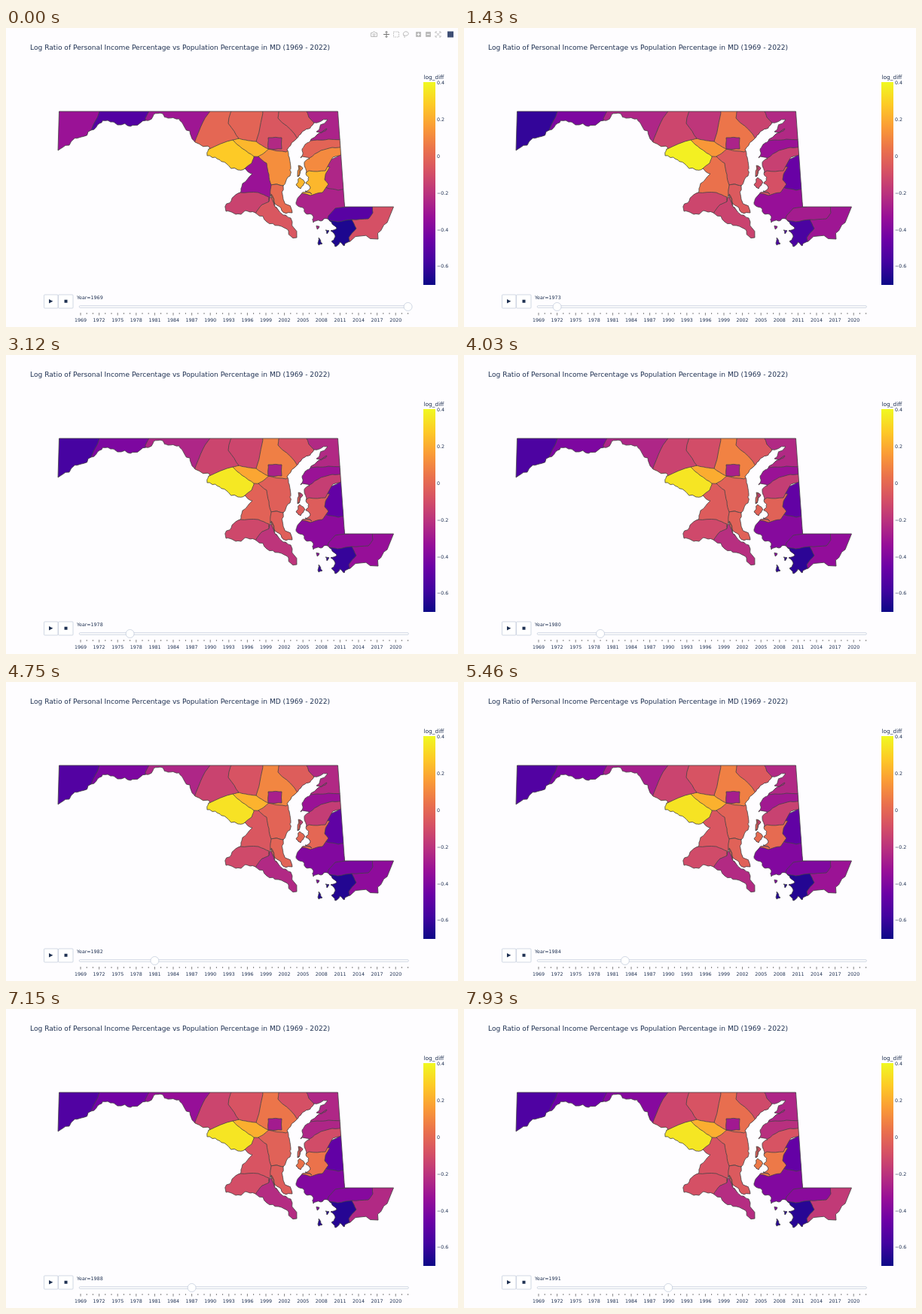
Recreate the animation shown at these times as an HTML page. Size 600 by 398 pixels, loop 8 s.

```html
<!DOCTYPE html>
<html lang="en">
<head>
<meta charset="utf-8">
<title>Income ratio map</title>
<style>
  html, body { margin: 0; width: 100%; height: 100%; overflow: hidden; background: #fefdff; }
  svg { display: block; width: 600px; height: 398px; font: 6.3px "DejaVu Sans", sans-serif; fill: #1f3152; }
  #map { stroke: #444; stroke-width: .8; stroke-linejoin: round; }
  .control { fill: #fff; stroke: #bec8d9; stroke-width: .7; }
  .icon { fill: none; stroke: #bbb; }
</style>
</head>
<body>
<svg viewBox="0 0 600 398">
  <defs>
    <linearGradient id="scale" x1="0" y1="1" x2="0" y2="0"></linearGradient>
    <clipPath id="land"></clipPath>
  </defs>
  <text x="32" y="28.6" font-size="9.11">Log Ratio of Personal Income Percentage vs Population Percentage in MD (1969 - 2022)</text>

  <g id="toolbar" class="icon">
    <path d="M484.5 6.5h2l1-1.5h2l1 1.5h2v5h-8z"/><circle cx="488.5" cy="9" r="1.4"/>
    <path stroke="#777" d="M501 8.5h8M505 4.5v8M503.5 6l1.5-1.5 1.5 1.5M503.5 11l1.5 1.5 1.5-1.5"/>
    <path stroke-dasharray="1.5 1" d="M514.5 5h7v7h-7z"/>
    <path d="M528 10c-2-3 1-6 4-5s3 4 0 5-4-1-4 0 2 1 1 3"/>
    <path fill="#bbb" d="M544.5 5.5h6v6h-6zM557.5 5.5h6v6h-6z"/>
    <path stroke="#fff" d="M545.5 8.5h4M547.5 6.5v4M558.5 8.5h4"/>
    <path d="M570 7V5h2M575 5h2v2M577 10v2h-2M572 12h-2v-2M571.5 6.500l4 4M575.5 6.5l-4 4"/>
    <rect x="586" y="4.5" width="8" height="8" fill="#3f4f75" stroke="none"/>
  </g>

  <g id="map"><g id="counties" clip-path="url(#land)"></g></g>

  <text x="554.5" y="68" font-size="7.4">log_diff</text>
  <rect x="554" y="72" width="16" height="270" fill="url(#scale)"/>
  <g id="scaleLabels"></g>

  <rect class="control" x="50.5" y="355" width="18.5" height="18" rx="1"/>
  <rect class="control" x="69.5" y="355" width="19.5" height="18" rx="1"/>
  <path d="M57 361l5.3 2.700-5.3 2.7zM77.5 361.7h4v4h-4z"/>
  <text id="year" x="94" y="361"></text>
  <rect class="control" x="97.3" y="369.7" width="437" height="2.6" rx="1"/>
  <g id="ticks"></g>
  <circle id="grip" class="control" cy="371" r="5.5"/>
</svg>
<script>
const LOOP = 8000, START = 130, STEP = 370, YEARS = 53, FIRST_X = 99, YEAR_WIDTH = 8.2;
const plasma = ['0d0887', '4303a0', '6c01a6', '970f98', 'b8307f', 'd55065', 'ea714c', 'fa9b36', 'fdca26', 'f0f921']
  .map(hex => [0, 2, 4].map(i => parseInt(hex.slice(i, i + 2), 16)));

const stateLine = '70.5 111 440.5 111 449.5 238 514.5 238';
const eastShore = '506 259 494 281 457 284 449 290 443 285 437 291 432 284 437 278 431 270 439 267 433 261 427 254 ' +
  '418 257 408 259 408 251 398 247 394 239 385 232 391 222 406 221 397 217 404 212 398 207 402 199 ' +
  '399 190 396 183 403 174 391 173 393 163 397 155 405 148 414 141 426 134 412 138 427 122 409 126';
const westShore = '402 134 392 140 384 149 373 162 376 172 378 185 377 197 368 210 368 228 380 246 366 243 356 233 ' +
  '352 221 357 238 368 249 378 253 386 279';
const potomac = '375 270 362 263 346 258 331 246 318 243 305 248 292 244 299 230 311 219 314 207 327 194 317 187 ' +
  '308 189 292 180 280 174 267 170 271 160 251 152 244 137 237 132 230 121 215 120 208 114 196 115 186 123 ' +
  '165 131 148 129 135 123 124 127 113 136 100 145 84 156 69 163';
const islands = ['388 183 394 187 387 198', '390 199 397 206 391 214 385 209', '412 263 416 264 413 268',
  '415 279 420 287 415 289', '424 269 429 270 426 274'];

// Levels (0 to 90 on the scale) of the opening view and of keySteps, then a coarse outline.
// Later counties cover earlier ones, and the land clips them all.
const keySteps = [4, 13, 22];
const counties = [
  /* Worcester */ ['50 32 28 43', '445 230 520 230 520 290 445 290'],
  /* Wicomico */ ['15 34 24 27', '420 232 487 232 487 246 481 254 459 255 440 275 420 265'],
  /* Dorchester */ ['36 30 25 25', '380 210 455 205 455 238 437 240 428 250 424 264 405 272 380 240'],
  /* Somerset */ ['3 12 4 5', '405 272 424 264 428 256 440 258 459 255 465 267 455 279 458 295 400 295'],
  /* Caroline */ ['37 19 17 18', '455 160 455 213 441 216 426 213 420 200 420 180'],
  /* Talbot */ ['76 50 57 62', '380 185 430 185 424 195 423 202 428 208 420 219 404 223 380 219'],
  /* Queen Anne's */ ['66 45 44 51', '380 178 403 165 418 155 450 150 450 168 434 172 424 190 402 190 382 200'],
  /* Kent */ ['56 31 31 40', '380 140 450 140 450 158 433 159 418 163 403 173 380 178'],
  /* Cecil */ ['36 38 38 37', '380 100 455 100 455 147 428 148 413 149 395 150'],
  /* St. Mary's */ ['52 46 38 39', '325 225 360 225 395 250 395 285 325 265'],
  /* Prince George's */ ['31 60 52 51', '300 165 350 165 360 205 351 222 349 231 300 235'],
  /* Charles */ ['46 47 48 50', '280 215 311 219 335 219 349 225 349 231 340 235 331 247 331 265 280 260'],
  /* Anne Arundel */ ['67 53 56 55', '325 165 352 150 390 150 390 195 371 211 360 208 352 209 349 195 346 180 335 171'],
  /* Calvert */ ['58 53 56 53', '352 209 360 208 371 211 395 250 372 250 356 236 351 222'],
  /* Montgomery */ ['80 88 85 86', '250 150 301 140 330 165 329 172 326 180 317 187 300 205 255 180'],
  /* Howard */ ['76 69 75 74', '301 140 331 140 350 160 343 166 335 171 329 171 313 160 301 149'],
  /* Harford */ ['52 46 54 48', '350 100 395 100 402 119 409 126 405 137 385 152 350 150'],
  /* Baltimore County */ ['52 61 65 59', '320 100 362 100 361 120 383 141 390 152 372 165 348 161 332 151 320 140'],
  /* Carroll */ ['56 42 51 51', '290 100 341 100 332 151 318 149 308 147 290 140'],
  /* Frederick */ ['57 47 46 47', '240 100 304 100 295 127 309 147 301 149 270 161 240 160'],
  /* Washington */ ['32 37 37 26', '170 100 278 100 261 126 250 153 170 150'],
  /* Allegany */ ['14 24 24 20', '105 100 195 100 185 120 187 140 105 150'],
  /* Garrett */ ['31 7 14 13', '60 100 129 100 113 136 112 170 60 170'],
  /* Baltimore City */ ['38 36 35 33', '348 146 366 146 366 161 348 161']
].map(([levels, outline]) => ({ levels: numbers(levels), outline: points(outline) }));

const $ = id => document.getElementById(id);
function add(parent, tag, attrs, text = '') {
  const node = document.createElementNS('http://www.w3.org/2000/svg', tag);
  for (const key in attrs) node.setAttribute(key, attrs[key]);
  node.textContent = text;
  return $(parent).appendChild(node);
}

function numbers(text) { return text.split(' ').map(Number); }
function points(text) {
  const n = numbers(text);
  return n.filter((_, i) => i % 2 === 0).map((x, i) => [x, n[2 * i + 1]]);
}

function noise(x, y) {
  const s = Math.sin(x * 12.9 + y * 78.2) * 43758.5;
  return s - Math.floor(s) - .5;
}

// Shifts each midpoint by a hash of its place, so that shared borders stay shared.
function roughen(line, amount, depth) {
  if (!depth) return line;
  const result = [line[0]];
  for (let i = 1; i < line.length; i++) {
    const [a, b] = [line[i - 1], line[i]];
    const x = (a[0] + b[0]) / 2, y = (a[1] + b[1]) / 2;
    const size = Math.hypot(a[0] - b[0], a[1] - b[1]) * amount;
    result.push([x + noise(x, y) * size, y + noise(y, x) * size], b);
  }
  return roughen(result, amount, depth - 1);
}
const closed = line => [...line, line[0]];
const toPath = line => `M${line.join(' ')}Z`;

function color(level) {
  const pos = level / 10, i = Math.min(8, Math.floor(pos));
  return `rgb(${plasma[i].map((c, k) => Math.round(c + (plasma[i + 1][k] - c) * (pos - i)))})`;
}

function levelAt(levels, step) {
  if (step === 0) return levels[0];
  if (step <= keySteps[0]) return levels[1];
  const i = keySteps.findIndex(key => key >= step);
  const part = (step - keySteps[i - 1]) / (keySteps[i] - keySteps[i - 1]);
  return levels[i] + (levels[i + 1] - levels[i]) * part;
}

plasma.forEach((rgb, i) => add('scale', 'stop', { offset: i / 9, 'stop-color': `rgb(${rgb})` }));
['0.4', '0.2', '0', '−0.2', '−0.4', '−0.6'].forEach((label, i) =>
  add('scaleLabels', 'text', { x: 572, y: 75.3 + i * 48.8 }, label));

for (let i = 0; i <= YEARS; i++) {
  const x = FIRST_X + i * YEAR_WIDTH, major = i % 3 === 0;
  add('ticks', 'path', { d: `M${x} 379v${major ? 3.5 : 2}`, stroke: '#333', 'stroke-width': .6 });
  if (major) add('ticks', 'text', { x, y: 391, 'text-anchor': 'middle' }, 1969 + i);
}

const coast = roughen(points([eastShore, westShore, potomac].join(' ')), .4, 2);
const landPath = toPath([...points(stateLine), ...coast]) +
  islands.map(island => toPath(roughen(closed(points(island)), .4, 2))).join('');
add('land', 'path', { d: landPath });
for (const county of counties)
  county.node = add('counties', 'path', { d: toPath(roughen(closed(county.outline), .1, 2)) });
add('map', 'path', { d: landPath, fill: 'none' });

let shown = -1;
function draw() {
  const t = performance.now() % LOOP;
  const step = t < START ? 0 : Math.floor((t - START) / STEP) + 1;
  $('toolbar').style.opacity = Math.max(0, Math.min(1, 1 - (t - START) / 300));
  if (step !== shown) {
    shown = step;
    $('year').textContent = `Year=${1969 + step}`;
    // The grip trails the label by one year.
    $('grip').setAttribute('cx', FIRST_X + YEAR_WIDTH * (step ? step - 1 : YEARS));
    for (const { levels, node } of counties) node.setAttribute('fill', color(levelAt(levels, step)));
  }
  requestAnimationFrame(draw);
}
draw();
</script>
</body>
</html>
```
